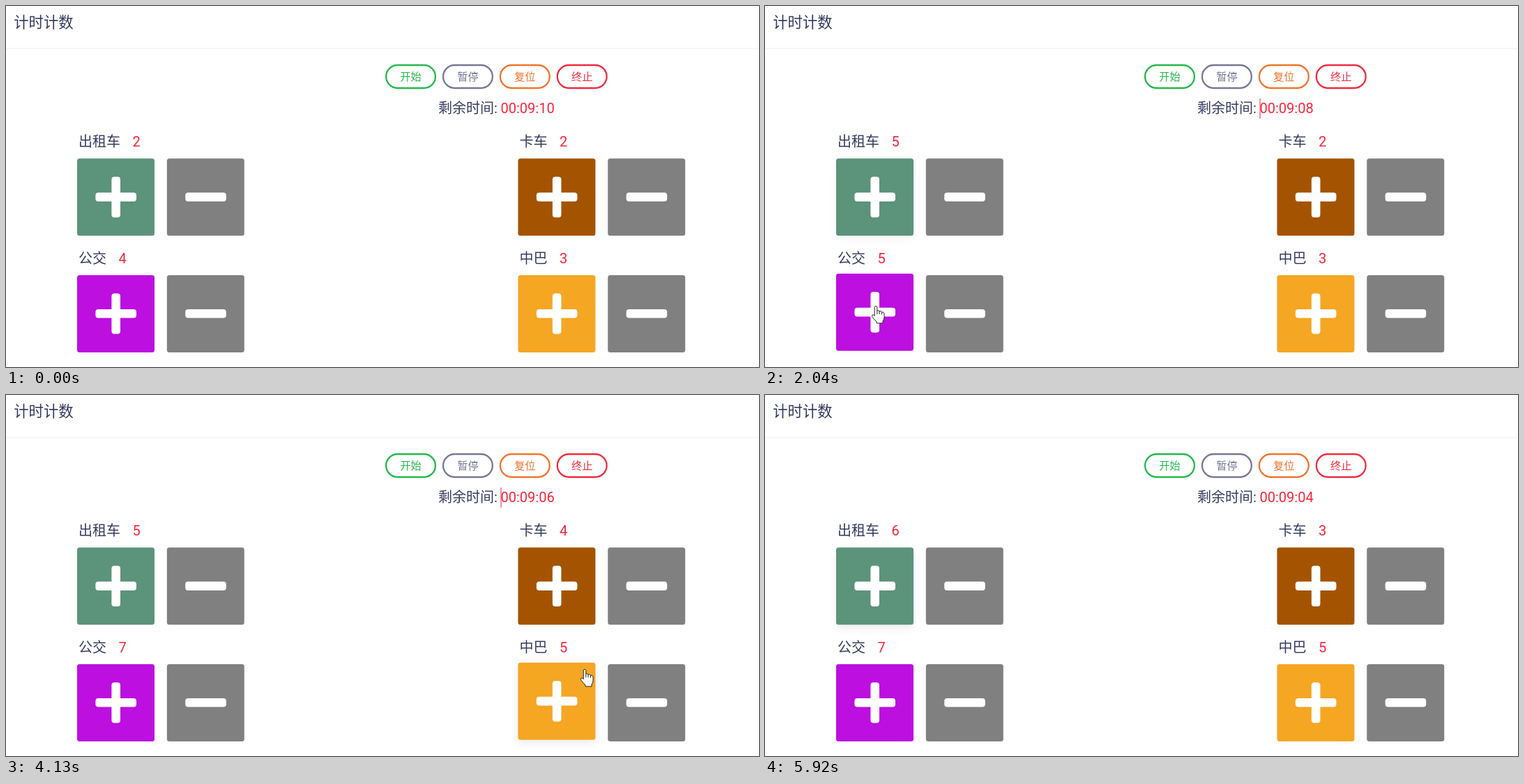
These frames come from a looping animation (1080 by 519 pixels, 6260 ms). An HTML page with a canvas:

```html
<!DOCTYPE html>
<html lang="zh-CN">
<head>
<meta charset="utf-8">
<title>计时计数</title>
<style>
html, body { margin: 0; width: 100%; height: 100%; overflow: hidden; background: #fff; }
canvas { display: block; width: 100vw; height: 100vh; }
</style>
</head>
<body>
<canvas id="stage" width="1080" height="519"></canvas>
<script>
const ctx = document.getElementById('stage').getContext('2d');
const FONT = 'Roboto, "Noto Sans CJK SC", "Noto Sans CJK", sans-serif';
const LOOP = 6260, END = 5920, BLINK = 500;
const INK = '#343a60', RED = '#f5253b', GREY = '#808080';
const SIZE = 111;

const pills = [['开始', '#22b94a'], ['暂停', '#767894'], ['复位', '#f1742b'], ['终止', '#f12b3d']];

const counters = [
  { name: '出租车', color: '#5c937b', start: 2 },
  { name: '公交', color: '#bc0fe0', start: 4 },
  { name: '卡车', color: '#a45400', start: 2 },
  { name: '中巴', color: '#f5a623', start: 3 }
];
counters.forEach((c, i) => {
  c.x = 102 + 632.4 * (i >> 1);
  c.y = 219.2 + 167.7 * (i % 2);
});

const tiles = counters.flatMap(c => [
  { counter: c, x: c.x, y: c.y, color: c.color, step: 1 },
  { counter: c, x: c.x + 128.8, y: c.y, color: GREY, step: -1 }
]);

// Where the pointer rests, when it arrives and leaves, how often it clicks
const stops = [
  { x: 948, y: 505, from: 70, to: 70, clicks: 0 },
  { x: 165, y: 290, from: 600, to: 1000, clicks: 2 },
  { x: 258, y: 289, from: 1130, to: 1235, clicks: 0 },
  { x: 172, y: 301, from: 1300, to: 1780, clicks: 1 },
  { x: 159, y: 431, from: 1950, to: 2520, clicks: 3 },
  { x: 784, y: 258, from: 3000, to: 3420, clicks: 2 },
  { x: 830, y: 394, from: 3720, to: 4200, clicks: 2 },
  { x: 905, y: 269, from: 4390, to: 4714, clicks: 1 },
  { x: 195, y: 318, from: 5220, to: 5740, clicks: 1 },
  { x: 845, y: 610, from: END, to: END, clicks: 0 }
];

const inside = (p, b) => p && p.x >= b.x && p.x <= b.x + SIZE && p.y >= b.y && p.y <= b.y + SIZE;

const clicks = stops.flatMap(s => Array.from({ length: s.clicks }, (_, k) => ({
  at: s.from + 60 + 130 * k,
  tile: tiles.find(b => inside(s, b))
})));

const hand = new Path2D('M-1.8 1.5Q0 -.9 1.8 1.5L1.8 7Q4 6 5 7.8Q7.5 7 8.5 9Q11.5 8.5 12 11L12 17Q11.5 20 10 22L10 25L1 25L1 23Q-3 19 -5.5 15.5Q-6 12.5 -3.5 13L-1.8 14.5Z');
const knuckles = new Path2D('M1.8 7V12M5 7.8V12M8.5 9V12.5');
const arrow = new Path2D('M0 0V18L4.2 14L7 20.5L9.8 19.3L7 13H12.8Z');

function pointer(t) {
  if (t < stops[0].from || t >= END) return null;
  const i = stops.findIndex(s => s.from > t);
  const a = stops[i - 1], b = stops[i];
  const u = Math.max(0, (t - a.to) / (b.from - a.to));
  const s = 1 - (1 - u) ** 3;
  return { x: a.x + (b.x - a.x) * s, y: a.y + (b.y - a.y) * s };
}

// Share of the time between two delays ago that the pointer spent on a tile
function hover(tile, t, near, far) {
  const n = 12;
  let hits = 0;
  for (let i = 0; i < n; i++) {
    if (inside(pointer(t - near - (far - near) * (i + 0.5) / n), tile)) hits++;
  }
  return hits / n;
}

function text(str, x, y, size, color, align = 'left') {
  ctx.font = `${size}px ${FONT}`;
  ctx.fillStyle = color;
  ctx.textAlign = align;
  ctx.fillText(str, x, y);
}

function box(x, y, w, h, r) {
  ctx.beginPath();
  ctx.roundRect(x, y, w, h, r);
}

function drawHeader() {
  text('计时计数', 11.2, 31, 21.4, INK);
  ctx.fillStyle = '#eeeff1';
  ctx.fillRect(0, 60.5, 1080, 1);

  pills.forEach(([label, color], i) => {
    const x = 545.1 + i * 81.9;
    box(x, 85, 70.8, 33, 16.5);
    ctx.strokeStyle = color;
    ctx.lineWidth = 2.3;
    ctx.stroke();
    text(label, x + 35.4, 106.5, 15.2, color, 'center');
  });
}

function drawClock(t) {
  const left = 10 - Math.floor((t + 500) / 1000);
  text('剩余时间:', 620, 154, 20, INK);
  text('00:09:' + String(left).padStart(2, '0'), 709.5, 154, 20, RED);

  // Each click restarts the caret's blink
  const last = clicks.findLast(c => c.at <= t);
  if (last && (t - last.at) % (2 * BLINK) < BLINK) {
    ctx.fillStyle = RED;
    ctx.fillRect(709.5, 133, 1, 29);
  }
}

function drawCounter(c, t) {
  const count = clicks.reduce((n, k) => k.at <= t && k.tile.counter === c ? n + k.tile.step : n, c.start);
  const x = c.x + 2, y = c.y - 17.2;
  text(c.name, x, y, 20, INK);
  text(count, x + c.name.length * 20 + 17.5, y, 20, RED);
}

function drawTile(b, t) {
  const y = b.y - 2.2 * hover(b, t, 60, 160);
  ctx.save();
  ctx.shadowColor = `rgba(0,0,0,${0.08 * hover(b, t, 160, 360)})`;
  ctx.shadowBlur = 13;
  ctx.shadowOffsetY = 5;
  ctx.fillStyle = b.color;
  box(b.x, y, SIZE, SIZE, 3.5);
  ctx.fill();
  ctx.restore();

  ctx.fillStyle = '#fff';
  box(b.x + 26.4, y + 49, 58.6, 12.7, 4);
  ctx.fill();
  if (b.step > 0) {
    box(b.x + 49.4, y + 26.3, 12.6, 58.4, 4);
    ctx.fill();
  }
}

function drawPointer(t) {
  const p = pointer(t);
  if (!p) return;
  const onTile = tiles.some(b => inside(p, b));
  const shape = onTile ? hand : arrow;
  ctx.save();
  ctx.translate(p.x, p.y);
  ctx.lineJoin = 'round';
  ctx.lineWidth = 1;
  ctx.fillStyle = '#fff';
  ctx.strokeStyle = '#222';
  ctx.fill(shape);
  ctx.stroke(shape);
  if (onTile) ctx.stroke(knuckles);
  ctx.restore();
}

function draw(now) {
  const t = Math.min(now % LOOP, END);
  ctx.fillStyle = '#fff';
  ctx.fillRect(0, 0, 1080, 519);
  drawHeader();
  drawClock(t);
  counters.forEach(c => drawCounter(c, t));
  tiles.forEach(b => drawTile(b, t));
  drawPointer(t);
}

const begin = performance.now();
function tick() {
  draw(performance.now() - begin);
  requestAnimationFrame(tick);
}
tick();
</script>
</body>
</html>
```
